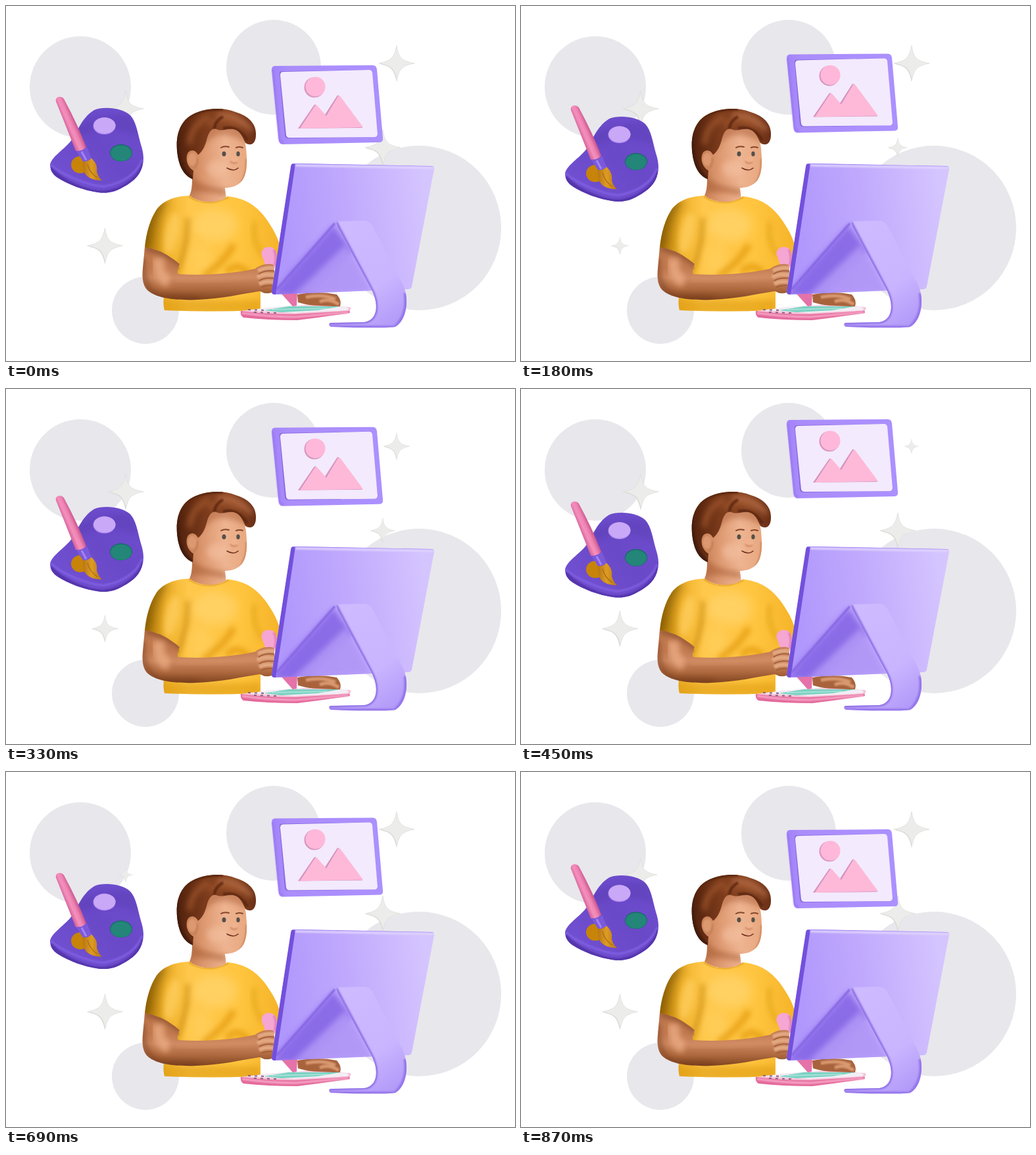
Write an HTML page that moves like this. It is 774x539 px and loops after 900 ms.

```html
<!DOCTYPE html>
<html lang="en">
<head>
<meta charset="utf-8">
<title>Designer at work</title>
<style>
html, body { margin: 0; width: 100%; height: 100%; overflow: hidden; background: #fff; }
svg { display: block; width: 100vw; height: 100vh; }
</style>
</head>
<body>
<svg viewBox="0 0 774 539" xmlns="http://www.w3.org/2000/svg">
<defs>
  <filter id="b1" x="-50%" y="-50%" width="200%" height="200%"><feGaussianBlur stdDeviation="1.3"/></filter>
  <filter id="b4" x="-50%" y="-50%" width="200%" height="200%"><feGaussianBlur stdDeviation="4"/></filter>
  <filter id="b8" x="-60%" y="-60%" width="220%" height="220%"><feGaussianBlur stdDeviation="8"/></filter>

  <linearGradient id="board" x1="0" y1="1" x2="1" y2="0">
    <stop offset="0" stop-color="#7352d4"/><stop offset=".55" stop-color="#6a49c8"/><stop offset="1" stop-color="#6f4fd0"/>
  </linearGradient>
  <linearGradient id="handle" gradientUnits="userSpaceOnUse" x1="91" y1="186" x2="107" y2="179">
    <stop offset="0" stop-color="#cf5f95"/><stop offset=".4" stop-color="#f58fbd"/><stop offset=".65" stop-color="#ee84b3"/><stop offset="1" stop-color="#c9558c"/>
  </linearGradient>
  <linearGradient id="tip" x1="0" y1="0" x2="1" y2="0">
    <stop offset="0" stop-color="#b87614"/><stop offset=".45" stop-color="#dd9c24"/><stop offset="1" stop-color="#b87610"/>
  </linearGradient>
  <linearGradient id="frame" x1="0" y1="0" x2="1" y2="0">
    <stop offset="0" stop-color="#a283fa"/><stop offset=".15" stop-color="#ab8dfa"/><stop offset="1" stop-color="#ab90ff"/>
  </linearGradient>
  <linearGradient id="hair" x1="0" y1="0" x2="1" y2="0">
    <stop offset="0" stop-color="#4f200c"/><stop offset=".35" stop-color="#7a3a1b"/><stop offset=".7" stop-color="#8a4624"/><stop offset="1" stop-color="#6a2f16"/>
  </linearGradient>
  <linearGradient id="skin" gradientUnits="userSpaceOnUse" x1="272" y1="0" x2="366" y2="0">
    <stop offset="0" stop-color="#c27a50"/><stop offset=".3" stop-color="#dd9870"/><stop offset=".65" stop-color="#eeb491"/><stop offset="1" stop-color="#e8a880"/>
  </linearGradient>
  <linearGradient id="shirt" gradientUnits="userSpaceOnUse" x1="212" y1="0" x2="417" y2="0">
    <stop offset="0" stop-color="#ac7505"/><stop offset=".16" stop-color="#f0b22a"/><stop offset=".32" stop-color="#ffc84c"/><stop offset=".7" stop-color="#ffc53f"/><stop offset="1" stop-color="#f5b428"/>
  </linearGradient>
  <linearGradient id="arm" gradientUnits="userSpaceOnUse" x1="0" y1="398" x2="0" y2="446">
    <stop offset="0" stop-color="#c27a50"/><stop offset=".3" stop-color="#cd8860"/><stop offset=".65" stop-color="#b06a40"/><stop offset="1" stop-color="#80451f"/>
  </linearGradient>
  <linearGradient id="screen" gradientUnits="userSpaceOnUse" x1="420" y1="340" x2="645" y2="310">
    <stop offset="0" stop-color="#b097fc"/><stop offset=".45" stop-color="#c0a9fd"/><stop offset="1" stop-color="#d5c5ff"/>
  </linearGradient>
  <linearGradient id="stand" gradientUnits="userSpaceOnUse" x1="510" y1="340" x2="605" y2="480">
    <stop offset="0" stop-color="#cdbaff"/><stop offset=".6" stop-color="#c9b5ff"/><stop offset="1" stop-color="#b097f8"/>
  </linearGradient>

  <path id="boardShape" d="M67 241C69 230 84 221 97 207C108 194 114 170 134 158C148 152 176 154 189 166C198 176 200 192 205 210C209 222 210 232 208 240C205 257 193 267 178 275C166 282 155 285 140 283C118 280 95 271 79 261C71 256 67 249 67 241Z"/>
  <path id="faceShape" d="M268 215C278 190 303 178 330 178C352 178 363 196 365 216C367 236 367 254 359 265C352 274 341 276 333 276L335 293C326 301 294 300 279 288C283 279 283 271 283 262C274 250 268 234 268 215Z"/>
  <path id="hairShape" d="M284 263C269 257 262 241 260 219C258 191 267 172 287 163C305 155 330 153 349 161C370 167 381 180 380 196C380 207 374 214 364 208C360 200 357 189 346 187C336 186 329 191 320 187C313 185 309 191 306 200C303 212 299 221 292 226C287 216 277 218 275 227C273 237 278 246 285 250Z"/>
  <path id="shirtShape" d="M280 288C291 300 325 301 337 289C362 291 382 303 397 325C410 344 417 358 417 374L408 398L387 404L387 458Q387 462 380 462Q310 465 241 462Q238 451 241 436L262 398Q238 382 211 367C213 345 219 324 229 309C240 294 260 288 280 288Z"/>
  <path id="armShape" d="M211 366Q239 370 264 392Q259 404 262 407C304 410 345 406 379 399C386 393 399 390 407 393L411 430Q400 441 386 433C359 437 327 445 289 446C258 447 231 444 217 433C207 425 207 411 208 399Z"/>
  <path id="screenShape" d="M438 239L648 243Q652 244 651 248L617 426Q616 430 611 430L409 438Q404 438 404 434L433 243Q434 239 438 239Z"/>
  <path id="standShape" d="M502 327L546 326Q554 327 558 335L604 424C614 445 609 478 592 487Q587 489 520 488L494 487Q489 484 493 481L545 480C565 477 568 453 555 429L504 335Z"/>

  <g id="star">
    <path d="M0-27C3-8 7-4 27 0C7 4 4 9 0 27C-4 9-8 4-27 0C-8-4-4-8 0-27Z" fill="#ececea" stroke="#dededb" stroke-width=".8"/>
    <path d="M-24 1C-8 4-4 9 0 24" fill="none" stroke="#d8d8d4" stroke-width="1.2"/>
  </g>
</defs>

<g fill="#e8e7ec">
  <circle cx="113" cy="123" r="77"/><circle cx="407" cy="93" r="72"/>
  <circle cx="628" cy="337" r="125"/><circle cx="212" cy="462" r="51"/>
</g>
<g id="stars"></g>

<g id="palette">
  <clipPath id="boardClip"><use href="#boardShape"/></clipPath>
  <use href="#boardShape" fill="url(#board)"/>
  <g clip-path="url(#boardClip)">
    <path d="M111 180C145 166 180 160 196 166L204 200C175 186 140 183 108 200Z" fill="#5a3cb0" opacity=".45" filter="url(#b4)"/>
    <path d="M68 241C82 254 121 272 148 274C176 270 199 255 207 234" fill="none" stroke="#8060e2" stroke-width="3" filter="url(#b1)"/>
    <path d="M67 247C82 265 121 284 148 284C178 282 205 261 210 238" fill="none" stroke="#5434ac" stroke-width="7" filter="url(#b1)"/>
  </g>
  <ellipse cx="149.500" cy="182" rx="17" ry="13" fill="#b48df0"/>
  <ellipse cx="150" cy="181.500" rx="16.500" ry="12" fill="#c9a8f8"/>
  <ellipse cx="175" cy="223" rx="17" ry="13" fill="#166c69"/>
  <ellipse cx="175" cy="223.500" rx="16" ry="12" fill="#238678"/>
  <ellipse cx="113" cy="241" rx="14" ry="13" fill="#c78408"/>
  <path d="M76 145C74 138 83 135 88 141Q110 182 122 214Q117 221 106 220Z" fill="url(#handle)"/>
  <path d="M107 220Q117 221 123 214L130 231Q126 237 117 236Z" fill="#7b59da"/>
  <path d="M115 221L122 234" stroke="#a184f4" stroke-width="3"/>
  <path d="M117 236Q125 237 130 231C137 238 139 243 138 251Q140 260 146 265C132 265 121 260 118 250Q117 244 117 236Z" fill="url(#tip)"/>
  <path d="M124 240Q127 253 139 261" fill="none" stroke="#a86c12" stroke-width="1.200"/>
</g>

<g id="picture">
  <path d="M409 91L558 90Q563 90 564 96L573 200Q574 207 568 207L421 210Q416 210 415 205L404 97Q404 91 409 91Z" fill="url(#frame)"/>
  <path d="M406 97L416 203Q417 207 422 207" fill="none" stroke="#9a78f2" stroke-width="2.500" filter="url(#b1)"/>
  <path d="M420 99L551 97Q555 97 556 101L565 194Q566 198 561 199L430 201Q425 201 424 197L416 104Q415 99 420 99Z" fill="#8a6be0"/>
  <path d="M422 100L552 97Q556 97 557 101L565 194Q565 199 560 199L431 200Q427 200 426 196L417 105Q417 100 422 100Z" fill="#f3eafd"/>
  <circle cx="469" cy="123.500" r="15.500" fill="#d896bf"/><circle cx="470.500" cy="122.500" r="15" fill="#ffb8d9"/>
  <path d="M444 186L468 151Q470 148 472 151L485 165L503 137Q505 134 507 137L542 185Z" fill="#d594c1"/>
  <path d="M447 186L470 151Q472 149 474 152L487 167L505 137Q507 135 509 138L543 184Z" fill="#ffb9d8"/>
</g>

<g id="person">
  <clipPath id="faceClip"><use href="#faceShape"/></clipPath>
  <use href="#faceShape" fill="url(#skin)"/>
  <g clip-path="url(#faceClip)">
    <path d="M280 256Q293 274 335 278L336 288Q305 280 278 284Z" fill="#a85f36" opacity=".6" filter="url(#b4)"/>
    <path d="M295 218Q320 180 366 208L364 175L290 175Z" fill="#a85b34" opacity=".5" filter="url(#b4)"/>
    <path d="M366 232Q367 258 354 274" fill="none" stroke="#d08a60" stroke-width="4" filter="url(#b1)"/>
    <ellipse cx="322" cy="247" rx="16" ry="13" fill="#f2bd9d" opacity=".7" filter="url(#b4)"/>
    <ellipse cx="283" cy="233" rx="7" ry="10" fill="#dc9870" filter="url(#b1)"/>
    <path d="M291 231Q292 240 286 247" fill="none" stroke="#c27b52" stroke-width="2" filter="url(#b1)"/>
  </g>
  <clipPath id="hairClip"><use href="#hairShape"/></clipPath>
  <use href="#hairShape" fill="url(#hair)"/>
  <g clip-path="url(#hairClip)" fill="none">
    <path d="M279 210Q281 180 309 168M309 181Q330 163 361 181" stroke="#9c522b" stroke-width="7" filter="url(#b4)"/>
    <path d="M322 166Q353 164 373 189" stroke="#b87048" stroke-width="6" filter="url(#b4)"/>
    <path d="M317 187Q317 175 330 168M330 186Q351 180 367 204" stroke="#552410" stroke-width="4" opacity=".8" filter="url(#b1)"/>
    <path d="M258 190Q257 247 285 265" stroke="#421b0b" stroke-width="7" filter="url(#b1)"/>
    <path d="M262 184Q280 155 330 156" stroke="#5a260f" stroke-width="5" filter="url(#b1)"/>
  </g>
  <path d="M327 215Q332 212 339 214M350 215Q355 213 360 215" fill="none" stroke="#84472b" stroke-width="2" stroke-linecap="round"/>
  <ellipse cx="331.500" cy="224.500" rx="3" ry="3.800" fill="#55504a"/><ellipse cx="353" cy="224.500" rx="2.700" ry="3.800" fill="#55504a"/>
  <ellipse cx="347" cy="233" rx="6" ry="5" fill="#f0b28d" filter="url(#b1)"/>
  <path d="M341 236Q346 241 352 237" fill="none" stroke="#c07450" stroke-width="1.500" filter="url(#b1)"/>
  <path d="M336 246Q346 252 353 246" fill="none" stroke="#71311f" stroke-width="1.600" stroke-linecap="round"/>

  <clipPath id="shirtClip"><use href="#shirtShape"/></clipPath>
  <use href="#shirtShape" fill="url(#shirt)"/>
  <g clip-path="url(#shirtClip)">
    <path d="M209 370Q214 316 240 292" fill="none" stroke="#654400" stroke-width="20" opacity=".55" filter="url(#b8)"/>
    <ellipse cx="252" cy="345" rx="10" ry="32" fill="#ffd063" opacity=".7" transform="rotate(12 252 345)" filter="url(#b4)"/>
    <path d="M277 322Q276 364 262 398L248 432" fill="none" stroke="#c48408" stroke-width="7" opacity=".7" filter="url(#b4)"/>
    <path d="M378 328Q374 360 391 380" fill="none" stroke="#d09410" stroke-width="4" opacity=".7" filter="url(#b4)"/>
    <ellipse cx="318" cy="333" rx="34" ry="26" fill="#ffd670" opacity=".7" filter="url(#b8)"/>
    <ellipse cx="298" cy="385" rx="16" ry="26" fill="#ffd060" opacity=".6" filter="url(#b8)"/>
    <path d="M300 411Q336 385 346 362M335 405Q352 385 369 408" fill="none" stroke="#dc9000" stroke-width="10" opacity=".6" filter="url(#b4)"/>
    <path d="M237 446H388V468H237Z" fill="#dc9a0a" opacity=".55" filter="url(#b4)"/>
    <path d="M278 289Q305 306 338 290" fill="none" stroke="#d8951a" stroke-width="2" filter="url(#b1)"/>
    <path d="M211 367Q239 381 262 399" fill="none" stroke="#906000" stroke-width="4" filter="url(#b1)"/>
  </g>
  <path d="M389 379C386 368 398 362 407 368C413 374 412 384 411 396L395 398Q393 387 389 379Z" fill="#f5a6d2"/>
  <path d="M407 370Q412 377 409 394" fill="none" stroke="#de7cb6" stroke-width="3" filter="url(#b1)"/>
  <clipPath id="armClip"><use href="#armShape"/></clipPath>
  <use href="#armShape" fill="url(#arm)"/>
  <g clip-path="url(#armClip)" fill="none">
    <path d="M211 367Q242 372 267 393" stroke="#7a4222" stroke-width="8" opacity=".7" filter="url(#b4)"/>
    <path d="M232 383Q230 411 248 419" stroke="#e8a880" stroke-width="17" opacity=".85" filter="url(#b4)"/>
    <path d="M208 382Q204 429 235 443L293 446" stroke="#743b1c" stroke-width="7" opacity=".7" filter="url(#b4)"/>
    <path d="M256 415Q321 418 383 407" stroke="#da976c" stroke-width="6" opacity=".6" filter="url(#b4)"/>
    <path d="M383 402Q395 396 410 398M382 412Q394 405 410 409M385 422Q396 416 410 420" stroke="#e2a882" stroke-width="6" filter="url(#b1)"/>
    <path d="M384 407Q395 400 410 403M385 417Q396 411 410 414M388 427Q397 423 410 425" stroke="#a05c38" stroke-width="1.500"/>
  </g>
</g>

<g id="tablet">
  <path d="M443 438Q474 432 503 438Q511 447 508 456Q475 459 444 450Z" fill="#a8633d"/>
  <path d="M456 442Q482 437 501 445M477 449Q491 443 506 453" fill="none" stroke="#d8986f" stroke-width="5" filter="url(#b1)"/>
  <path d="M357 463L436 467L522 460L523 466Q484 472 443 477Q397 477 361 473Q356 470 357 463Z" fill="#e4699b"/>
  <path d="M359 466Q398 472 441 472L521 465" fill="none" stroke="#f7a8c8" stroke-width="3" filter="url(#b1)"/>
  <path d="M358 463L399 458L455 454L523 457Q527 460 521 463L440 468Q393 468 358 463Z" fill="#f6c3d8"/>
  <path d="M365 462L430 455L516 457Q525 459 518 462L439 466Z" fill="#f2eef5"/>
  <path d="M392 462L430 456L509 456L474 462L419 465Z" fill="#7ad2c2"/>
  <path d="M404 461L489 459" stroke="#a5e1d7" stroke-width="2"/>
  <path d="M368 461L392 462M377 465L411 466" stroke="#8a6284" stroke-width="2" stroke-dasharray="4 6"/>
  <path d="M418 436L443 436L442 455L436 456Z" fill="#e572a8"/>
</g>

<g id="monitor">
  <clipPath id="screenClip"><use href="#screenShape"/></clipPath>
  <use href="#screenShape" fill="url(#screen)"/>
  <g clip-path="url(#screenClip)">
    <path d="M404 440L432 406L498 333L526 372L460 439Z" fill="#805ee2" opacity=".8" filter="url(#b4)"/>
    <path d="M436 440L517 362L557 434Z" fill="#b096f6" opacity=".9" filter="url(#b4)"/>
    <path d="M500 330L412 430" stroke="#8563e2" stroke-width="3" filter="url(#b1)"/>
    <path d="M434 239L440 240L410 439L402 439Z" fill="#7350dc"/>
    <path d="M440 242L650 246" stroke="#dfd3ff" stroke-width="3" filter="url(#b1)"/>
    <path d="M436 239L650 243" stroke="#ab91f2" stroke-width="1.500"/>
  </g>
  <clipPath id="standClip"><use href="#standShape"/></clipPath>
  <use href="#standShape" fill="url(#stand)"/>
  <g clip-path="url(#standClip)" fill="none">
    <path d="M502 328L555 428C570 456 563 479 545 480L490 482" stroke="#8f6fe6" stroke-width="4" filter="url(#b1)"/>
    <path d="M490 487L591 488Q612 469 607 436" stroke="#9576ea" stroke-width="5" filter="url(#b1)"/>
  </g>
</g>
</svg>
<script>
const LOOP = 900, STEP = 30, HALF = LOOP / 2;
const $ = id => document.getElementById(id);

// x, y, time of smallest size
const stars = [[594, 87, 450], [182, 156, 690], [573, 215, 228], [150.5, 364, 210]].map(([x, y, low]) => {
  const el = document.createElementNS("http://www.w3.org/2000/svg", "use");
  el.setAttribute("href", "#star");
  $("stars").append(el);
  return { el, x, y, low };
});

const shift = (el, y) => el.setAttribute("transform", `translate(0 ${y.toFixed(2)})`);

function draw(now) {
  const t = Math.floor((now % LOOP) / STEP) * STEP;
  const rise = 1 - Math.abs(t - HALF) / HALF;
  shift($("picture"), -44 * rise);
  shift($("palette"), 33 * rise);
  for (const { el, x, y, low } of stars) {
    const size = 0.41 + 0.59 * Math.min(1, Math.abs(t - low) / 210);
    el.setAttribute("transform", `translate(${x} ${y}) scale(${size.toFixed(3)})`);
  }
}

const start = performance.now();
function tick() {
  draw(performance.now() - start);
  requestAnimationFrame(tick);
}
draw(0);
requestAnimationFrame(tick);
</script>
</body>
</html>
```
